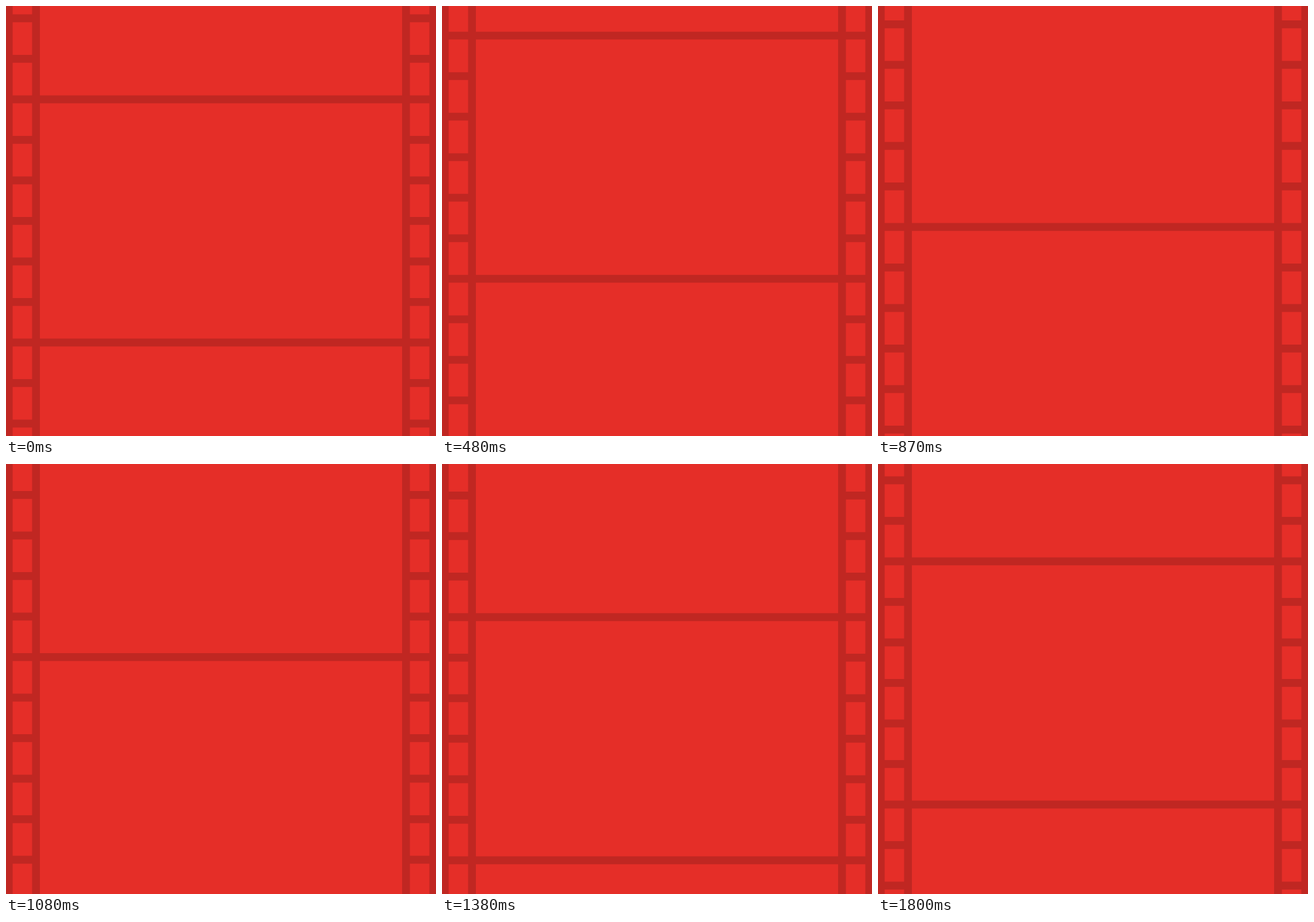
An HTML page that plays this animation: 748x748 px, repeating every 1.83 s.

```html
<!DOCTYPE html>
<html lang="en">
<head>
<meta charset="utf-8">
<title>Film strip</title>
<style>
  html, body { margin: 0; width: 100%; height: 100%; overflow: hidden; background: #c02722; }
  svg { display: block; width: 100%; height: 100%; }
  /* Dashes are the film's windows; six perforations span one picture. */
  path { fill: none; stroke: #e52e28; animation: roll 1830ms steps(61) infinite; }
  .picture { stroke-width: 630px; stroke-dasharray: 409.3px 13.7px; }
  .holes { stroke-width: 33.8px; stroke-dasharray: 56.8px 13.7px; }
  @keyframes roll {
    from { stroke-dashoffset: 0px; }
    to { stroke-dashoffset: 423px; }
  }
</style>
</head>
<body>
<svg viewBox="0 0 748 748">
  <path class="holes" d="M28.5 -253.7V760"/>
  <path class="picture" d="M374 -253.7V760"/>
  <path class="holes" d="M719.5 -253.7V760"/>
</svg>
</body>
</html>
```
